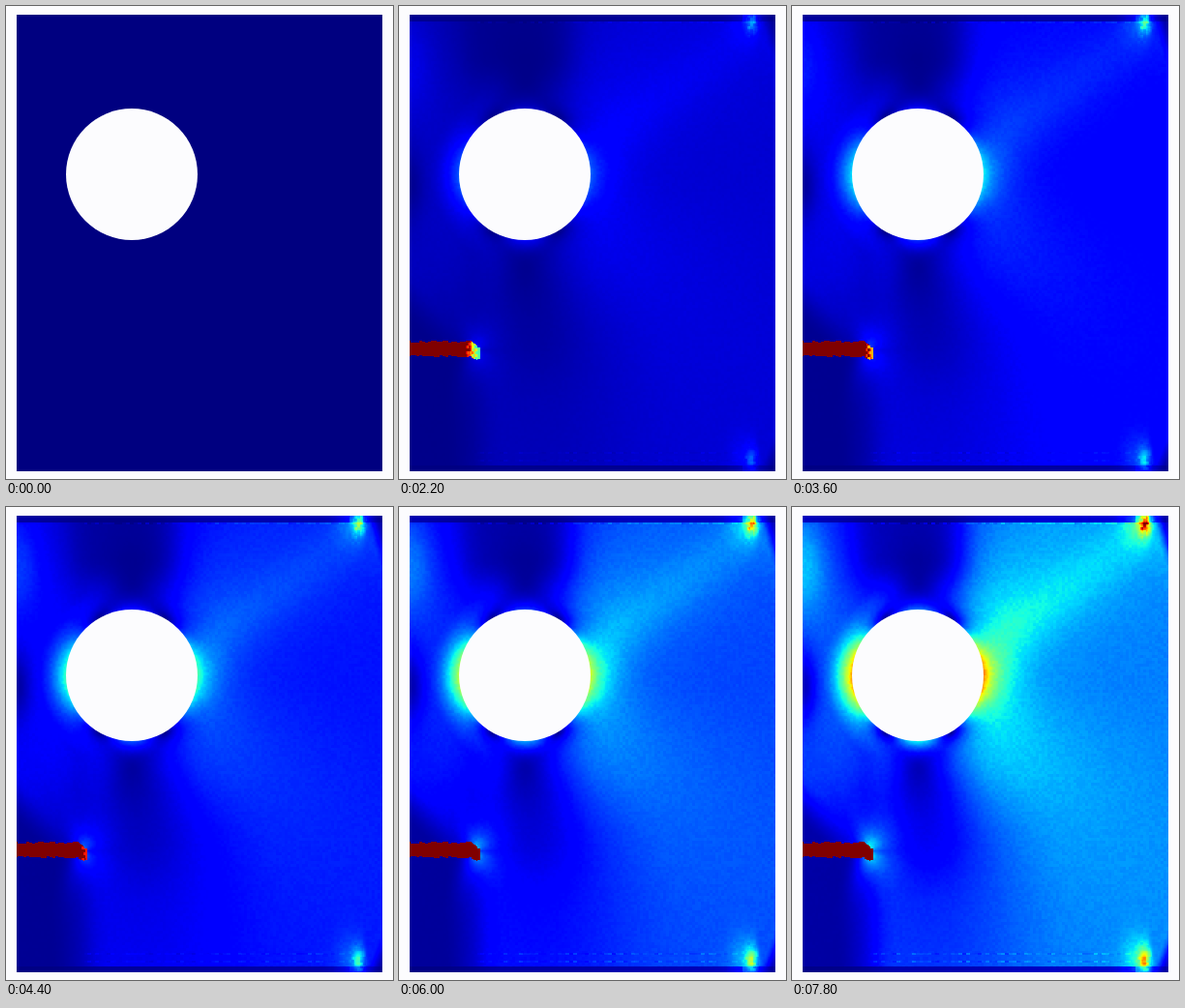
Write an HTML page with a canvas that moves like this. It is 400 by 489 pixels and loops after 8 s.

```html
<!DOCTYPE html>
<html lang="en">
<head>
<meta charset="utf-8">
<title>Stress field</title>
<style>
  html, body { margin: 0; width: 100%; height: 100%; overflow: hidden; background: #fcfcfe; }
  canvas { display: block; width: 400px; height: 489px; }
</style>
</head>
<body>
<canvas id="stage" width="400" height="489"></canvas>
<script>
const ctx = document.getElementById('stage').getContext('2d');
const LOOP = 8000, STEP = 200, FULL_LOAD = 7800;
const plate = { left: 11, top: 9, right: 389, bottom: 481 };
const hole = { x: 130, y: 174, r: 68 };
const tip = { x: 80, y: 355 };
const W = plate.right - plate.left, H = plate.bottom - plate.top;

const clamp = (v, lo = 0, hi = 1) => Math.min(hi, Math.max(lo, v));
const mix = (a, b, k) => a + (b - a) * k;
const smooth = (a, b, v) => {
  const k = clamp((v - a) / (b - a));
  return k * k * (3 - 2 * k);
};
const bell = (dx, dy = 0) => Math.exp(-dx * dx - dy * dy);
const hash = (x, y) => {
  const s = Math.sin(x * 127.1 + y * 311.7) * 43758.5453;
  return s - Math.floor(s);
};
const grain = (x, y) => hash(Math.floor(x / 3), Math.floor(y / 3)) - 0.5;

// Von Mises stress around a round hole under vertical tension
function holeStress(x, y) {
  const dx = x - hole.x, dy = y - hole.y;
  const r2 = Math.max(dx * dx + dy * dy, hole.r ** 2);
  const q = hole.r ** 2 / r2;
  const angle = 2 * Math.atan2(dx, dy);
  const c = Math.cos(angle), s = Math.sin(angle);
  const radial = 0.5 * (1 - q + (1 - 4 * q + 3 * q * q) * c);
  const hoop = 0.5 * (1 + q - (1 + 3 * q * q) * c);
  const shear = 0.5 * (1 + 2 * q - 3 * q * q) * s;
  return Math.sqrt(radial ** 2 - radial * hoop + hoop ** 2 + 3 * shear ** 2);
}

function stress(x, y) {
  const edge = Math.min(y - plate.top, plate.bottom - y);
  const upper = y < 245;
  let v = 0.25 * holeStress(x, y);

  // the narrow side left of the hole carries less, except at its upper edge
  const gap = Math.hypot(x - hole.x, y - hole.y) - hole.r;
  v *= 1 - 0.42 * smooth(0, 32, gap) * (1 - smooth(70, 110, x));
  v += 0.14 * bell((x - 11) / 24, (y - 60) / 55);

  // unloaded zones: above and below the hole, at the left edge, around the crack
  v *= 1 - 0.72 * Math.exp(-(((x - 122) / 56) ** 4)) * (1 - smooth(50, 108, y));
  v *= 1 - 0.25 * bell((x - 138) / 45) * smooth(250, 300, y) * (1 - smooth(340, 420, y));
  v *= 1 - 0.7 * bell((x - 11) / 14, (y - 185) / 34);
  const shade = y > tip.y
    ? 1 - smooth(45, 95, x)
    : 1 - smooth(35, 85, x + (tip.y - y) * 0.9);
  v *= 1 - 0.72 * shade;
  v *= 1 - 0.2 * smooth(270, 350, y) * (1 - smooth(150, 290, x));
  v += 0.1 * bell((x - hole.x) / 28, (y - 242) / 10);

  // band running from the hole to the upper right clamp
  const along = clamp((x - 190) / 174);
  v += 0.055 * bell((y - mix(155, 25, along)) / 36) * smooth(185, 225, x);

  const wedge = 369 + edge * (upper ? 0.3 : 0.42);
  v *= 1 - 0.8 * smooth(wedge, wedge + 17, x) * (1 - smooth(25, 70, edge));
  if (edge < 7) v *= x < 355 ? 0.25 : 0.55;

  const dash = hash(Math.floor(x / 4), upper ? 1 : 2);
  const row = upper ? edge >= 7 && edge < 9
                    : (edge > 10 && edge < 13) || (edge > 18 && edge < 21);
  if (row && x > 80 && x < 350) v += 0.09 * dash - 0.03;

  // clamp ends
  const end = upper ? 16 : 467, peak = upper ? 0.55 : 0.36;
  v += peak * bell((x - 364) / 6, (y - end) / 11) * (1 + 0.7 * grain(x, y));
  v += 0.13 * bell((x - 358) / 17, (y - end) / 24) * (1 - smooth(366, 374, x));

  // crack tip lobes
  const dx = x - tip.x, dy = y - tip.y, d = Math.hypot(dx, dy);
  const lobe = 0.4 + 0.6 * Math.abs(dy) / (d + 1);
  v += 0.42 * Math.exp(-d / 16) * lobe * smooth(-22, 4, dx + Math.abs(dy) * 0.35);

  return v * (1 + 0.07 * grain(x, y));
}

// Damage growth rate, falling towards the tip
function damage(x, y) {
  const rough = 3 * grain(x, Math.sign(y - 354) * 9);
  const sag = smooth(73, 82, x);
  const top = 346.5 + rough + sag * 6, bottom = 361.5 + rough + sag * 3;
  if (y < top || y > bottom || x > 83) return 0;
  return mix(1, 0.3, clamp((x - 62 - 5 * grain(x, y)) / 18));
}

function jet(value) {
  const v = clamp(value);
  const red = Math.min((v - 0.35) / 0.31, 1 - (v - 0.89) / 0.22);
  const green = Math.min((v - 0.125) / 0.25, (0.91 - v) / 0.27);
  const blue = Math.min(0.5 + v / 0.22, (0.65 - v) / 0.31);
  return [red, green, blue].map(k => 255 * clamp(k));
}

const field = new Float32Array(W * H), crack = new Float32Array(W * H);
for (let i = 0; i < W * H; i++) {
  const x = plate.left + i % W, y = plate.top + Math.floor(i / W);
  field[i] = stress(x, y);
  crack[i] = damage(x, y);
}
const palette = Array.from({ length: 1001 }, (_, i) => jet(i / 1000));
const image = ctx.createImageData(W, H);

function draw(time) {
  const load = time / FULL_LOAD, growth = 0.67 * time / 1000;
  for (let i = 0; i < W * H; i++) {
    const v = clamp(Math.max(field[i] * load, crack[i] * growth));
    const color = palette[Math.round(v * 1000)];
    image.data.set(color, i * 4);
    image.data[i * 4 + 3] = 255;
  }
  ctx.fillStyle = '#fcfcfe';
  ctx.fillRect(0, 0, 400, 489);
  ctx.putImageData(image, plate.left, plate.top);
  ctx.beginPath();
  ctx.arc(hole.x, hole.y, hole.r, 0, 2 * Math.PI);
  ctx.fill();
}

const start = performance.now();
let shown = -1;
function tick() {
  const elapsed = Math.max(0, performance.now() - start) % LOOP;
  const time = Math.floor(elapsed / STEP) * STEP;
  if (time !== shown) draw(shown = time);
  requestAnimationFrame(tick);
}
tick();
</script>
</body>
</html>
```
